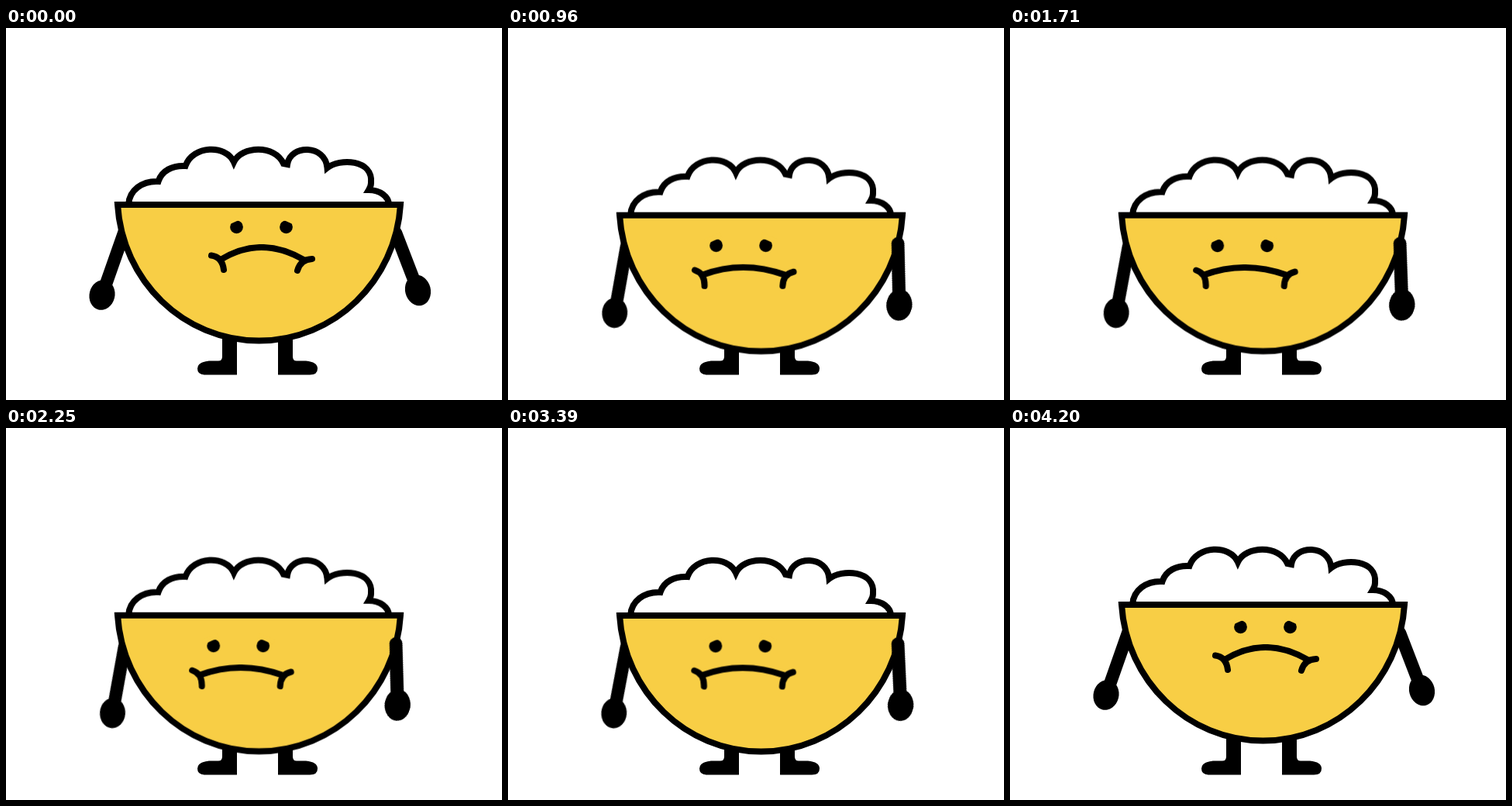
Write an HTML page without scripts that moves like this. It is 640 px wide and 480 px high and loops after 4.53 s.

```html
<!DOCTYPE html>
<html lang="en">
<head>
<meta charset="utf-8">
<title>Sad rice bowl</title>
<style>
  html, body { margin: 0; width: 100%; height: 100%; overflow: hidden; background: #fff; }
  svg { display: block; width: 100%; height: 100%; }

  .line { fill: none; stroke: #000; stroke-width: 8; }
  .rice { fill: #fff; }
  .bowl { fill: #f8ce45; }
  .limb { stroke-width: 16.4; stroke-linecap: round; }
  .mouth { stroke-width: 8; stroke-linecap: round; stroke-linejoin: round; }
  .lid { stroke: #f8ce45; stroke-width: 6; }

  /* one shared clock; each part has its own return time */
  .body, .face, .arm, .mouth, .lid, .front {
    animation: 4530ms cubic-bezier(.65, 0, .35, 1) infinite;
  }
  .body { --drop: 14px; animation-name: sink; }
  .body.loose { --drop: 20px; animation-name: sink; }
  .face { animation-name: look; }
  .mouth { animation-name: frown; }
  .lid { animation-name: lift; }
  .arm { animation-name: swing; }
  .left { --low: -9.6deg; --out: -8.9deg; transform-origin: 153px 262px; }
  .right { --low: 20.3deg; --out: 18.9deg; transform-origin: 503px 264.5px; }
  .front { animation-name: show; animation-timing-function: linear; }

  @keyframes sink {
    0%, 92.5%, 100% { transform: none; }
    25.6%, 44.6%, 63.6%, 78.4% { transform: translateY(var(--drop)); }
    35.1%, 54.1% { transform: translateY(calc(var(--drop) - .5px)); }
  }
  @keyframes look {
    0%, 92.5%, 100% { transform: none; }
    25.6%, 73.6% { transform: translate(-29.8px, 10.5px); }
  }
  @keyframes swing {
    0%, 92.5%, 100% { transform: rotate(0deg); }
    25.6%, 44.6%, 63.6% { transform: rotate(var(--low)); }
    35.1%, 54.1%, 71.5% { transform: rotate(var(--out)); }
  }
  @keyframes frown {
    0%, 92.5%, 100% {
      d: path("M265 293.5Q279 295.5 281 312M277 299Q329 267 384 299M395 298Q380 298.5 376 313");
    }
    25.6%, 73.6% {
      d: path("M270 288.5Q283 292.5 282.5 309M280 294.5Q332 275.5 386 294.5M397.5 290.5Q384 293.5 383.5 309");
    }
  }
  @keyframes lift {
    0%, 21%, 75%, 92.5%, 100% { transform: none; }
    11.9%, 83.4% { transform: translateY(-5px); }
  }
  @keyframes show {
    0%, 92.5%, 100% { opacity: 0; }
    11.9%, 83.4% { opacity: .13; }
    21.2%, 77% { opacity: 1; }
  }
</style>
</head>
<body>
<svg viewBox="0 0 640 480">
  <defs>
    <g id="armR">
      <path class="line limb" d="M503 264.5L531.5 338.5"/>
      <ellipse cx="531.5" cy="338.5" rx="16.4" ry="20" transform="rotate(-14 531.5 338.5)"/>
    </g>
    <path id="leg" d="M279 392H298V447.5H257Q247 447.5 247 439.5Q247 431 262 429.5H274Q279 429.5 279 424Z"/>
  </defs>

  <use href="#leg"/>
  <use href="#leg" transform="matrix(-1 0 0 1 649 0)"/>

  <g class="body loose">
    <g class="arm left">
      <path class="line limb" d="M153 262L124 344.5"/>
      <ellipse cx="124" cy="344.5" rx="16.4" ry="19.5" transform="rotate(14 124 344.5)"/>
    </g>
  </g>

  <g class="body">
    <use class="arm right" href="#armR"/>

    <path class="line rice" d="M158 228C159 209 176 197 196.5 198C201 184 215 177 231.5 178
      C241 151 284 150 294 173C304 152 347 150 358 175L363 176C367 150 412 150 414.5 180.5
      C430 168 474 169 471 200Q471 204 468 209C483 209 494 218 494 228"/>
    <path class="line bowl" d="M144 228H509C503 326 424 403.5 326.5 403.5S150 326 144 228Z"/>

    <g class="face">
      <circle cx="297.5" cy="256.8" r="8.4"/>
      <circle cx="361.5" cy="256.8" r="8.4"/>
      <path class="line lid" d="M284 252L303 243.5M375 252L356 243.5"/>
      <path class="line mouth" d="M265 293.5Q279 295.5 281 312M277 299Q329 267 384 299M395 298Q380 298.5 376 313"/>
    </g>

    <g class="front"><use class="arm right" href="#armR"/></g>
  </g>
</svg>
</body>
</html>
```
